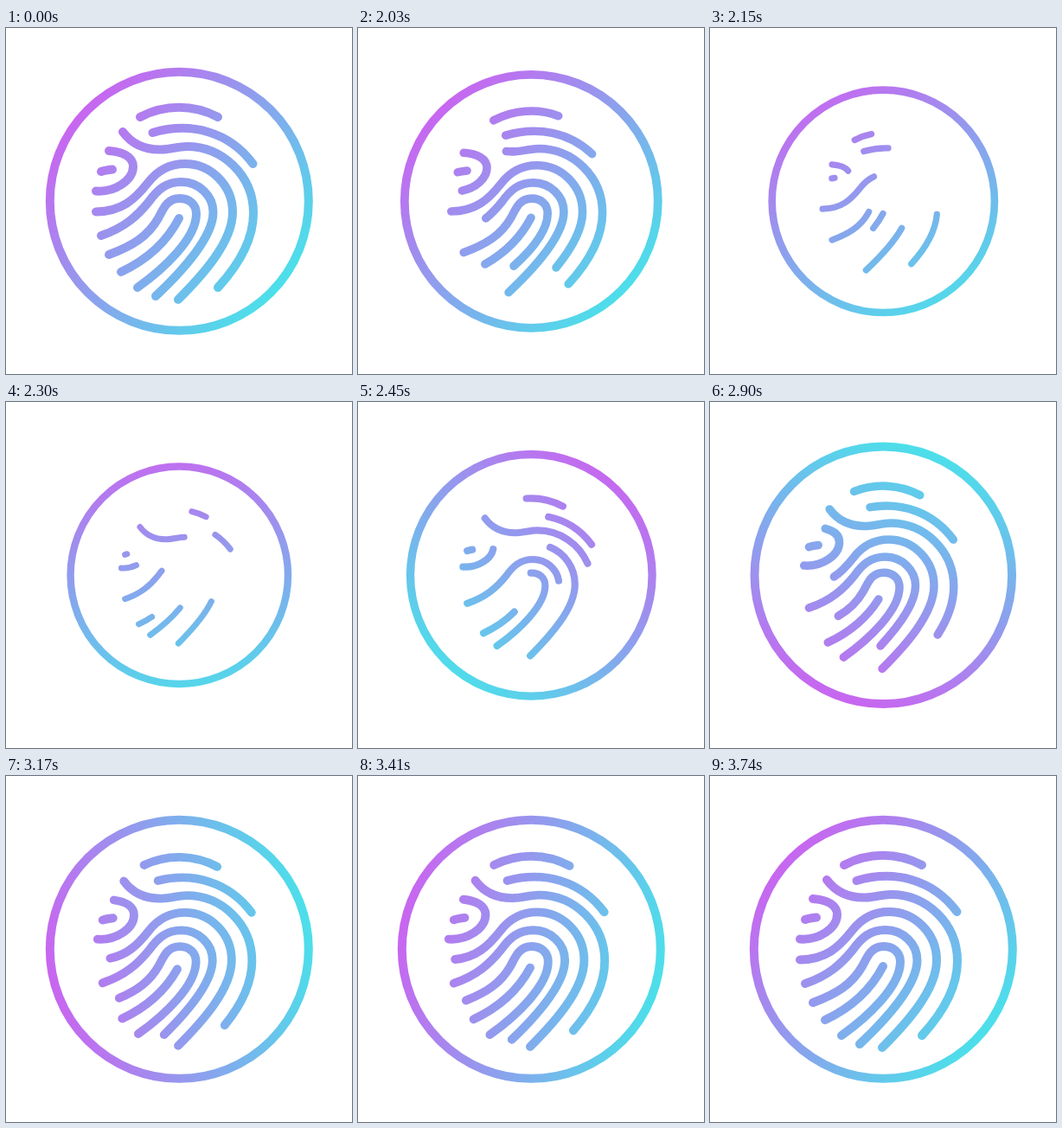
Recreate the animation shown at these times as an HTML page. Size 400x400 px, loop 3.83 s.

```html
<!DOCTYPE html>
<html lang="en">
<head>
<meta charset="utf-8">
<title>Fingerprint</title>
<style>
  html, body { margin: 0; width: 100%; height: 100%; overflow: hidden; background: #fff; }
  svg { display: block; width: 100%; height: 100%; }
  #ink { fill: none; stroke: #fff; stroke-width: 10; stroke-linecap: round; }
</style>
</head>
<body>
<svg viewBox="0 0 400 400">
  <defs>
    <linearGradient id="tint" gradientUnits="userSpaceOnUse" x1="45" y1="200" x2="355" y2="200">
      <stop offset="0" stop-color="#c965f0"/>
      <stop offset="1" stop-color="#4be0ea"/>
    </linearGradient>
    <mask id="shape" maskUnits="userSpaceOnUse" x="0" y="0" width="400" height="400">
      <g id="ink">
        <circle id="ring" cx="200.3" cy="200.3" r="149.5"/>
        <g id="print"></g>
      </g>
    </mask>
  </defs>
  <rect width="400" height="400" fill="url(#tint)" mask="url(#shape)"/>
</svg>
<script>
  const LOOP = 3830, START = 2030, STEP = 30, LAST = 3740;
  const SHRINK = 2000, TURN = 2215;

  // Each ridge starts at the end that retracts first and regrows first.
  const RIDGES = [
    'M245 103C217 88 183 88 155 103',
    'M285.5 157C258 120 214 108 169.5 121',
    'M135 120C146 135 162 141 180 140.5C190 140 200 137 209 137C251 137 286 171 286 214C286 246 267 276 245 300',
    'M104 188.5C126 190 147 176 147 160C147 149 135 143 119 142',
    'M110 166C114 164.5 118 164 123 163.5',
    'M199 314C226 287 262 248 262 213C262 182 237 157 207 157C187 157 174 166 164 179C149 198 134 212 104 212.5',
    'M110 240C137 231 152 217 165 201C175 187 185 178 203 178C223 178 239.5 194 239.5 213C239.5 241 205 280 173 310',
    'M152 300C183 278 220 243 220 215C220 204 212 197 201 197C186 197 182 209 176 220C164 241 146 252 119 262',
    'M133 282C163 268 186 247 200 220'
  ];

  const $ = id => document.getElementById(id);
  const ring = $('ring'), print = $('print'), tint = $('tint');

  const ridges = RIDGES.map(d => {
    const path = document.createElementNS('http://www.w3.org/2000/svg', 'path');
    path.setAttribute('d', d);
    path.setAttribute('pathLength', 1);
    return print.appendChild(path);
  });

  // Smooth monotone curve through [time, value] points.
  function curve(points) {
    const secant = points.slice(1).map(([t, v], i) => (v - points[i][1]) / (t - points[i][0]));
    const slope = points.map((_, i) => {
      const a = secant[i - 1], b = secant[i];
      if (a === undefined) return b;
      if (b === undefined) return a;
      return a * b > 0 ? 2 * a * b / (a + b) : 0;
    });
    const end = points.length - 1;
    return t => {
      if (t <= points[0][0]) return points[0][1];
      if (t >= points[end][0]) return points[end][1];
      const i = points.findIndex(p => p[0] > t) - 1;
      const [t0, v0] = points[i], [t1, v1] = points[i + 1];
      const h = t1 - t0, u = (t - t0) / h, w = 1 - u;
      return v0 * (1 + 2 * u) * w * w + v1 * u * u * (3 - 2 * u) +
        h * (slope[i] * u * w * w - slope[i + 1] * u * u * w);
    };
  }

  const grow = curve([[TURN, 0], [2300, .27], [2450, .57], [2690, .79], [3170, .955], [LAST, 1]]);
  const ringDip = curve([[TURN, .215], [2300, .159], [2450, .065], [2690, .013], [3080, 0]]);
  const spin = curve([[SHRINK, 40], [START, 44], [2300, 82], [2450, 128], [2690, 223], [3170, 348], [LAST, 400]]);

  function pose(t) {
    if (t < START) return { from: 0, to: 1, print: 1, ring: 1, angle: 40 };
    const angle = spin(t);
    if (t < TURN) {
      const from = (t - SHRINK) / (TURN - SHRINK);
      const dip = from ** 1.2;
      return { from, to: 1, print: 1 - .42 * dip, ring: 1 - .215 * dip, angle };
    }
    const to = grow(t);
    return { from: 0, to, print: 1 - .42 * (1 - to), ring: 1 - ringDip(t), angle };
  }

  const scaleAt = (k, c) => `translate(${c} ${c}) scale(${k}) translate(${-c} ${-c})`;

  function draw(time) {
    let t = time % LOOP;
    if (t >= START) t = Math.min(LAST, START + Math.floor((t - START) / STEP) * STEP);
    const p = pose(t);
    const whole = p.to - p.from >= 1;
    const dash = whole ? 'none' : `${p.to - p.from} 3`;
    for (const ridge of ridges) {
      ridge.style.strokeDasharray = dash;
      ridge.style.strokeDashoffset = -p.from;
    }
    print.setAttribute('transform', scaleAt(p.print, 200));
    ring.setAttribute('transform', scaleAt(p.ring, 200.3));
    tint.setAttribute('gradientTransform', `rotate(${p.angle} 200 200)`);
  }

  const begin = performance.now();
  function tick() {
    draw(performance.now() - begin);
    requestAnimationFrame(tick);
  }
  tick();
</script>
</body>
</html>
```
